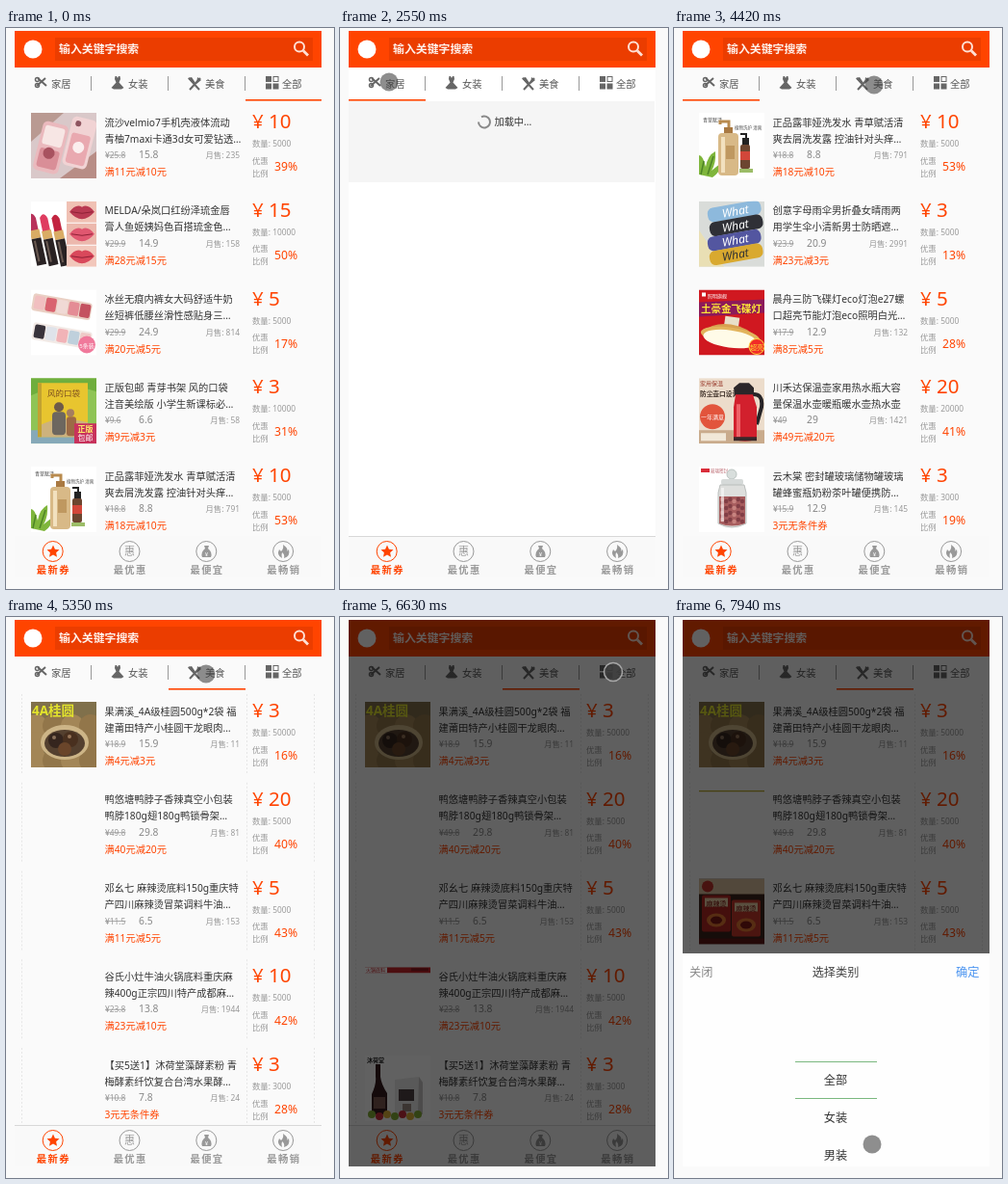
An HTML page for the animation above (8000 ms loop, 341 by 582 pixels).

```html
<!DOCTYPE html>
<html lang="zh-CN">
<head>
<meta charset="utf-8">
<title>优惠券列表</title>
<style>
html, body { margin: 0; width: 100%; height: 100%; overflow: hidden; background: #fafafa; }
svg { display: block; }
text { font-family: "Noto Sans", "Noto Sans CJK SC", "Noto Sans CJK", sans-serif; white-space: pre; }
</style>
</head>
<body>
<svg id="stage" width="341" height="582" viewBox="0 0 341 582"></svg>
<script>
const ORANGE = '#ff4400', GRAY = '#999';
const rect = (x, y, w, h, fill, more = '') => `<rect x="${x}" y="${y}" width="${w}" height="${h}" fill="${fill}" ${more}/>`;
const disc = (x, y, r, fill, more = '') => `<circle cx="${x}" cy="${y}" r="${r}" fill="${fill}" ${more}/>`;
const oval = (x, y, rx, ry, fill, more = '') => `<ellipse cx="${x}" cy="${y}" rx="${rx}" ry="${ry}" fill="${fill}" ${more}/>`;
const path = (d, fill, more = '') => `<path d="${d}" fill="${fill}" ${more}/>`;
const line = (d, stroke, w = 1, more = '') => path(d, 'none', `stroke="${stroke}" stroke-width="${w}" ${more}`);
const text = (x, y, s, size, fill, more = '') => `<text x="${x}" y="${y}" font-size="${size}" fill="${fill}" ${more}>${s}</text>`;
const group = (id, body) => `<g id="${id}">${body}</g>`;
const turn = (deg, x, y, body) => `<g transform="rotate(${deg} ${x} ${y})">${body}</g>`;
const many = (n, fn) => Array.from({ length: n }, (_, i) => fn(i)).join('');
const MID = 'text-anchor="middle"', END = 'text-anchor="end"', BOLD = 'font-weight="700"';

// Product pictures, 68 by 68
const fill = c => rect(0, 0, 68, 68, c);
const pics = {
  cases: () => fill('#d9c8c9') + path('M0 0H34L0 30Z', '#b99a92') + path('M68 40V68H30Z', '#b88d86') +
    turn(14, 20, 36, rect(7, 10, 27, 52, '#eab9bd', 'rx="5"') + rect(10, 14, 21, 20, '#f7e6e4', 'rx="3"') +
      rect(10, 38, 21, 20, '#d98e97', 'rx="3"') + disc(20, 42, 6, '#a8525f')) +
    turn(14, 50, 33, rect(37, 5, 26, 52, '#f1d3d4', 'rx="5"') + rect(40, 22, 20, 32, '#e9a9b0', 'rx="3"') +
      disc(50, 36, 6, '#fbeeee') + disc(44, 12, 3, '#8e5560')),
  lipsticks: () => fill('#fff') + turn(-12, 18, 40, many(3, i => {
    const x = 2 + i * 12, y = 6 + i * 3;
    return path(`M${x} ${y + 22}V${y + 7}Q${x + 5} ${y} ${x + 8} ${y + 9}V${y + 22}Z`, ['#b8325a', '#df3c60', '#c22440'][i]) +
      rect(x - 1, y + 21, 10, 9, '#d9ac65') + rect(x - 1, y + 30, 10, 28, '#292223') + rect(x + 1, y + 32, 2, 22, '#6a5a52');
  })) + many(3, i => {
    const y = i * 23;
    return rect(37, y, 31, 22, ['#f0c1b4', '#ecb8ad', '#f2c7bb'][i]) +
      path(`M40 ${y + 11}Q47 ${y + 2} 53 ${y + 6}Q59 ${y + 2} 66 ${y + 11}Q53 ${y + 26} 40 ${y + 11}Z`, ['#b93a52', '#e05770', '#d9485b'][i]) +
      line(`M42 ${y + 11}Q53 ${y + 14} 64 ${y + 11}`, '#8f2136');
  }),
  briefs: () => fill('#fff') + many(2, j => turn(10, 34, 18 + j * 30,
    rect(1, 9 + j * 30, 62, 18, j ? '#f2eae6' : '#ead0c4', 'rx="3"') +
    many(5, i => rect(3 + i * 12, 11 + j * 30, 11, 14,
      [['#f1bfc0', '#d9636f', '#f0d9d5', '#e48c95', '#c45260'], ['#38333b', '#dfe3ea', '#f1b3b7', '#bfd0dc', '#eecac7']][j][i], 'rx="2"')))) +
    disc(58, 57, 9, '#f0799b') + text(58, 60, '5条装', 6, '#fff', MID),
  book: () => fill('#8fc455') + path('M0 0H68V14Q34 2 0 18Z', '#6fae3d') + rect(0, 54, 68, 14, '#86a9b8') +
    rect(7, 5, 52, 56, '#e8c52f') + rect(7, 5, 4, 56, '#c2a231') + text(34, 19, '风的口袋', 8.5, '#7a4d20', MID) +
    path('M11 48Q30 38 59 46V61H11Z', '#cdb27d') +
    disc(29, 30, 5, '#6e5a49') + rect(22, 35, 14, 24, '#6d675f', 'rx="4"') +
    disc(41, 36, 4, '#a57d5f') + rect(37, 40, 10, 20, '#9c6a45', 'rx="3"') +
    rect(45, 47, 23, 21, '#c8325c') + text(56.5, 56, '正版', 8, '#fff36b', MID + BOLD) + text(56.5, 65, '包邮', 8, '#fff', MID),
  shampoo: () => fill('#fff') + text(4, 9, '青草赋活', 5, '#444') + text(37, 17, '植物洗护 清爽', 4.5, '#555') +
    path('M0 64V44Q4 44 7 56Q9 44 17 40Q18 52 13 60L23 52Q22 62 14 67Z', '#7fb63c') + line('M2 64L5 50M9 64L15 45', '#4e8427', 1.5) +
    line('M22 12V9H31V16', '#b98b4f', 3) + rect(26, 15, 9, 7, '#a97942') +
    rect(20, 21, 21, 44, '#d8b987', 'rx="4"') + rect(23, 25, 4, 37, '#f2e1bf') + rect(28, 34, 9, 14, '#bf9860') +
    line('M43 22H49V27', '#222', 2) + rect(45, 26, 7, 8, '#222') +
    rect(43, 33, 10, 25, '#6c4630', 'rx="2"') + rect(43, 40, 10, 9, '#d2473a') + rect(42, 58, 14, 4, '#9cbd68'),
  umbrellas: () => fill('#d9dcd9') + path('M0 30L26 68H0Z', '#e9dfb4') + many(4, i =>
    turn(-10, 36, 12 + i * 15, rect(9 + i % 2 * 2, 3 + i * 15, 56, 15, ['#8db9dc', '#2f3036', '#5356a0', '#d9a92f'][i], 'rx="6"') +
      text(38, 15 + i * 15, 'What', 12, i == 3 ? '#333' : '#fff', MID + ' font-style="italic"'))),
  lamp: () => fill('#d01820') + rect(3, 3, 4, 4, '#fff') + text(9, 8, '照明旗舰', 5, '#fff') +
    path('M0 13L68 10V24L0 28Z', '#8c1a5a') + text(2, 23, '土豪金飞碟灯', 10.5, '#ffe837', BOLD) +
    turn(8, 32, 45, rect(25, 28, 15, 12, '#e8dfc8') + path('M3 48Q14 36 32 36Q50 36 63 48Z', '#d7a150') +
      oval(33, 48, 31, 9, '#e2b45c') + oval(33, 51, 28, 9, '#fffbe8')) +
    disc(60, 59, 8, '#f12c28', 'stroke="#ffd73d"') + text(60, 62, '超亮', 7, '#ffe837', MID),
  thermos: () => fill('#ecdccb') + rect(0, 54, 68, 14, '#c9ab8c') +
    text(1, 8, '家用保温', 6, '#9a3c2e') + text(1, 19, '防尘壶口设计', 6.7, '#3e3028', BOLD) +
    disc(14, 40, 13, '#e2543c') + text(14, 43, '一年满意', 6, '#fff', MID) + rect(2, 57, 26, 8, '#f1e8d8') +
    line('M54 17Q67 15 65 30L60 48', '#272427', 4) + path('M36 10L42 5H52L57 10V18H37Z', '#2b2629') +
    path('M38 17H56L60 30V63Q48 68 36 63V30Z', '#d2202d') + rect(39, 27, 4, 34, '#ef6268') + rect(36, 61, 24, 4, '#38282a'),
  jar: () => fill('#fff') + rect(2, 2, 9, 4, '#d92d3a') + text(12, 6, '玻璃密封', 4.5, '#bb6870') +
    disc(34, 8, 5, '#d8dedc', 'stroke="#bbc4c1"') + rect(23, 13, 23, 6, '#d6dad9', 'rx="2"') +
    path('M22 19H47L49 27V59Q34 67 20 59V27Z', '#dedfdd', 'stroke="#b9bdbb"') +
    path('M21 31H48V59Q34 64 21 59Z', '#a75d5e') +
    many(24, i => disc(24 + i % 6 * 4.2, 34 + Math.floor(i / 6) * 7 + i % 2 * 2, 2.2, i % 3 ? '#823f46' : '#c78480')) +
    rect(23, 22, 3, 35, '#fff', 'opacity=".55"'),
  longan: () => fill('#80704b') + many(12, i => disc(5 + i % 4 * 19, 25 + Math.floor(i / 4) * 18, 12, i % 2 ? '#92764a' : '#a38657')) +
    text(1, 14, '4A桂圆', 13.5, '#e4e52c', BOLD) +
    oval(35, 42, 25, 18, '#cdb587') + oval(35, 43, 21, 14, '#54402f') +
    disc(26, 40, 8, '#35251e') + disc(41, 39, 8, '#49301f') + disc(35, 49, 7, '#6a452a') +
    disc(24, 37, 2, '#88705a') + disc(40, 36, 2, '#98765a'),
  topLine: () => rect(0, 0, 68, 1.5, '#b6a62d'),
  packs: () => fill('#3b211b') + rect(0, 0, 68, 16, '#d8bf9b') + disc(9, 8, 6, '#bf3329') +
    many(2, i => rect(3 + i * 31, 17 + i * 5, 30, 38, ['#b32722', '#c7382b'][i], 'rx="2"') +
      rect(6 + i * 31, 20 + i * 5, 24, 9, '#ead0a5') + text(18 + i * 31, 28 + i * 5, '麻辣烫', 7, '#7e1813', MID) +
      oval(18 + i * 31, 43 + i * 5, 10, 7, '#e37831') + oval(18 + i * 31, 43 + i * 5, 6, 4, '#7c1716')) +
    rect(0, 62, 68, 6, '#5f1715'),
  banner: () => rect(0, 0, 68, 6, '#c9242a') + rect(0, 0, 23, 6, '#fff') + text(1, 5, '火锅底料', 5, '#c9242a') + rect(48, 1, 18, 3, '#8e171d'),
  enzyme: () => fill('#fff') + text(2, 7, '沐荷堂', 6, '#222', BOLD) +
    path('M11 9H16V22Q17 30 23 39V61H7V40Q12 29 11 22Z', '#341b1c') + rect(9, 43, 12, 12, '#7b5750') +
    path('M31 25L56 22L60 28V61H31Z', '#ececeb') + path('M56 22L60 28V61H55Z', '#c8c6c5') +
    rect(35, 35, 16, 12, '#4f4244') + rect(39, 50, 9, 8, '#9b8c84') +
    many(7, i => disc(7 + i * 8, 61 + i % 2 * 2, 4, ['#85ad36', '#c82e39', '#deb238'][i % 3]))
};

// title, title, old price, price, sold, coupon, value, quantity, percent, picture, picture time
const shampooRow = ['正品露菲娅洗发水 青草赋活清', '爽去屑洗发露 控油针对头痒…', '18.8', '8.8', 791, '满18元减10元', 10, 5000, 53, 'shampoo', 0];
const lists = {
  all: [
    ['流沙velmio7手机壳液体流动', '青柚7maxi卡通3d女可爱钻透…', '25.8', '15.8', 235, '满11元减10元', 10, 5000, 39, 'cases', 0],
    ['MELDA/朵岚口红纷泽琉金唇', '膏人鱼姬姨妈色百搭琉金色…', '29.9', '14.9', 158, '满28元减15元', 15, 10000, 50, 'lipsticks', 0],
    ['冰丝无痕内裤女大码舒适牛奶', '丝短裤低腰丝滑性感贴身三…', '29.9', '24.9', 814, '满20元减5元', 5, 5000, 17, 'briefs', 0],
    ['正版包邮 青芽书架 风的口袋', '注音美绘版 小学生新课标必…', '9.6', '6.6', 58, '满9元减3元', 3, 10000, 31, 'book', 0],
    shampooRow
  ],
  home: [
    shampooRow,
    ['创意字母雨伞男折叠女晴雨两', '用学生伞小清新男士防晒遮…', '23.9', '20.9', 2991, '满23元减3元', 3, 5000, 13, 'umbrellas', 3430],
    ['晨舟三防飞碟灯eco灯泡e27螺', '口超亮节能灯泡eco照明白光…', '17.9', '12.9', 132, '满8元减5元', 5, 5000, 28, 'lamp', 3430],
    ['川禾达保温壶家用热水瓶大容', '量保温水壶暖瓶暖水壶热水壶', '49', '29', 1421, '满49元减20元', 20, 20000, 41, 'thermos', 3570],
    ['云木棠 密封罐玻璃储物罐玻璃', '罐蜂蜜瓶奶粉茶叶罐便携防…', '15.9', '12.9', 145, '3元无条件券', 3, 3000, 19, 'jar', 3720]
  ],
  food: [
    ['果满溪_4A级桂圆500g*2袋 福', '建莆田特产小桂圆干龙眼肉…', '18.9', '15.9', 11, '满4元减3元', 3, 50000, 16, 'longan', 0],
    ['鸭悠塘鸭脖子香辣真空小包装', '鸭脖180g翅180g鸭锁骨架…', '49.8', '29.8', 81, '满40元减20元', 20, 5000, 40, 'topLine', 7490],
    ['邓幺七 麻辣烫底料150g重庆特', '产四川麻辣烫冒菜调料牛油…', '11.5', '6.5', 153, '满11元减5元', 5, 5000, 43, 'packs', 7790],
    ['谷氏小灶牛油火锅底料重庆麻', '辣400g正宗四川特产成都麻…', '23.8', '13.8', 1944, '满23元减10元', 10, 5000, 42, 'banner', 5520],
    ['【买5送1】沐荷堂藻酵素粉 青', '梅酵素纤饮复合台湾水果酵…', '10.8', '7.8', 24, '3元无条件券', 3, 3000, 28, 'enzyme', 5520]
  ]
};

const row = ([t1, t2, old, now, sold, coupon, value, qty, pct, pic, at], i) =>
  `<g transform="translate(0 ${i * 91.75})">
  <svg x="26" y="88" width="68" height="68" data-at="${at}">${pics[pic]()}</svg>` +
  text(102.5, 101.5, t1, 10.25, '#333') + text(102.5, 118.5, t2, 10.25, '#333') +
  text(103, 135, '¥' + old, 8.4, GRAY, 'text-decoration="line-through"') +
  text(138, 135, now, 10.3, '#888') + text(243, 135, '月售: ' + sold, 8.4, GRAY, END) +
  text(102.5, 153, coupon, 10.25, ORANGE) + text(256, 104, '¥ ' + value, 20.5, ORANGE) +
  text(256, 123, '数量: ' + qty, 8.4, GRAY) + text(256, 140.5, '优惠', 8.4, GRAY) +
  text(256, 153.5, '比例', 8.4, GRAY) + text(279, 148, pct + '%', 12.2, ORANGE) + '</g>';

const dots = many(5, i => line(`M16.5 ${80 + i * 91.75}v84M250.5 ${80 + i * 91.75}v84M320.5 ${80 + i * 91.75}v84`, '#e6e6e6', 1, 'stroke-dasharray="2 2"'));

const header = rect(9, 3, 319, 38, ORANGE) + disc(28, 22, 9.5, '#fff') +
  rect(51, 10, 268, 24, '#eb3d00') + text(55, 26, '输入关键字搜索', 11.9, '#fff0ea', BOLD) +
  disc(305, 19.5, 5, 'none', 'stroke="#ffe0d4" stroke-width="2"') + line('M309 23.5L314 28.5', '#ffe0d4', 2.8);

const tabIcons = [
  line('M33 52L42 60M32 60L41 52', '#666', 2) + many(2, i => disc(32.5, 53.5 + i * 6, 2, 'none', 'stroke="#666" stroke-width="1.5"')),
  path('M113.5 50H115L116 52L117 50H118.5L119 53L117.500 56.500L122.500 62L120 63.500H112L109.500 62L114.500 56.500L113 53Z', '#666'),
  line('M190 52L201 64M202 52L191 64', '#666', 2) + path('M189 52L193 51L197 57L195 58ZM199 51L203 54L198 58Z', '#666'),
  many(4, i => rect(270.5 + i % 2 * 7.5, 50.5 + (i >> 1) * 7.5, 5, 5, i == 1 ? 'none' : '#666', 'stroke="#666"'))
];
const tabs = ['家居', '女装', '美食', '全部'].map((s, i) => tabIcons[i] + text(47 + i * 80, 62, s, 10.3, '#555')).join('') +
  many(3, i => line(`M${88.5 + i * 80} 50V65`, GRAY)) + rect(0, 74, 80, 1.6, ORANGE, 'id="mark"');

const navIcons = [
  path('M49 536.500l1.900 4.200 4.600.5-3.400 3.100.9 4.500-4-2.300-4 2.300.9-4.500-3.400-3.100 4.600-.5Z', ORANGE),
  text(128.5, 547, '惠', 11, GRAY, MID),
  path('M206 537H211L210 540Q215 544 213 549H204Q202 544 207 540Z', GRAY) + text(208.5, 548, '¥', 6, '#fff', MID),
  path('M288 536Q294 540 292 543L294 541Q296 548 289 550Q290 546 287 544Q286 547 287 550Q281 547 284 541L286 543Q289 540 288 536Z', GRAY)
];
const nav = rect(9, 527, 319, 43, '#f9f9f9') + line('M9 527.5H328', '#d8d8d8', 1, 'id="edge"') +
  ['最新券', '最优惠', '最便宜', '最畅销'].map((s, i) => {
    const x = 48.7 + i * 79.8, color = i ? GRAY : ORANGE;
    return disc(x, 543, 10.5, 'none', `stroke="${color}"`) + navIcons[i] +
      text(x + .7, 566, s, 10.3, color, `${MID} letter-spacing="1.4" ${BOLD}`);
  }).join('');

const loading = rect(9, 41, 319, 486, '#fff') + rect(9, 76, 318, 84, '#f5f5f5') +
  group('spin', line('M-3 -5.2A6 6 0 1 1 -6 0', '#888', 2)) + text(160.5, 101, '加载中...', 10.2, '#333');

const sheet = rect(9, 349, 319, 221, '#fefefe') + text(16, 372.5, '关闭', 12.2, '#888') +
  text(168, 372.5, '选择类别', 12.2, '#444', MID) + text(293, 372.5, '确定', 12.2, '#4a94f0') +
  line('M126 461.5H211M126 499.5H211', '#7bb87f') +
  ['全部', '女装', '男装'].map((s, i) => text(168, 484.5 + i * 39, s, 12.2, '#333', MID)).join('');

const $ = id => document.getElementById(id);
$('stage').innerHTML = '<clipPath id="phone"><rect x="9" y="3" width="319" height="567"/></clipPath>' +
  rect(0, 0, 341, 582, '#fafafa') + '<g clip-path="url(#phone)">' +
  group('loading', loading) + Object.keys(lists).map(k => group(k, (k == 'food' ? dots : '') + lists[k].map(row).join(''))).join('') +
  header + tabs + nav + rect(9, 3, 319, 567, '#000', 'id="shade" opacity=".62"') + group('sheet', sheet) + '</g>' +
  disc(0, 0, 9.5, '#3c3c3c', 'id="touch" stroke-width="1.6"');

const timed = [...document.querySelectorAll('[data-at]')];
const show = (el, on) => el.style.display = on ? '' : 'none';
// Progress from a to b, held in n steps
const step = (t, a, b, n) => Math.floor(Math.min(1, Math.max(0, (t - a) / (b - a))) * n) / n;

// start, end, steps, from x y, to x y
const moves = [
  [1460, 2150, 5, 281, 328, 51, 56],
  [4000, 4420, 3, 51, 56, 208, 59],
  [5520, 6080, 4, 208, 59, 284, 57],
  [7080, 7640, 4, 284, 57, 206, 531],
  [7640, 7940, 2, 206, 531, 206, 547]
];

function draw(t) {
  const busy = t >= 2550 && t < 3280 || t >= 4540 && t < 5230;
  const view = t < 2550 ? 'all' : t < 4540 ? 'home' : 'food';
  show($('loading'), busy);
  for (const k in lists) show($(k), !busy && k == view);
  for (const el of timed) show(el, t >= el.dataset.at);
  show($('edge'), busy || view == 'food');
  $('mark').setAttribute('x', { all: 249, home: 9, food: 169 }[view]);
  $('spin').setAttribute('transform', `translate(150 97.5) rotate(${Math.floor((t - 2550) / 145) * 52})`);

  show($('shade'), t >= 6630);
  show($('sheet'), t >= 6770);
  const up = step(t, 6630, 7060, 3);
  $('sheet').setAttribute('transform', `translate(0 ${221 * (1 - up) ** 2})`);

  const touch = $('touch'), move = moves.filter(m => t >= m[0]).pop();
  show(touch, move);
  if (!move) return;
  const [a, b, n, x0, y0, x1, y1] = move, p = step(t, a, b, n);
  touch.setAttribute('cx', x0 + (x1 - x0) * p);
  touch.setAttribute('cy', y0 + (y1 - y0) * p);
  const pressed = t >= 6630 && t < 6900;
  touch.setAttribute('stroke', pressed ? '#b5b5b5' : 'none');
  touch.setAttribute('opacity', pressed ? .85 : .58);
}

(function tick() {
  draw(performance.now() % 8000);
  requestAnimationFrame(tick);
})();
</script>
</body>
</html>
```
